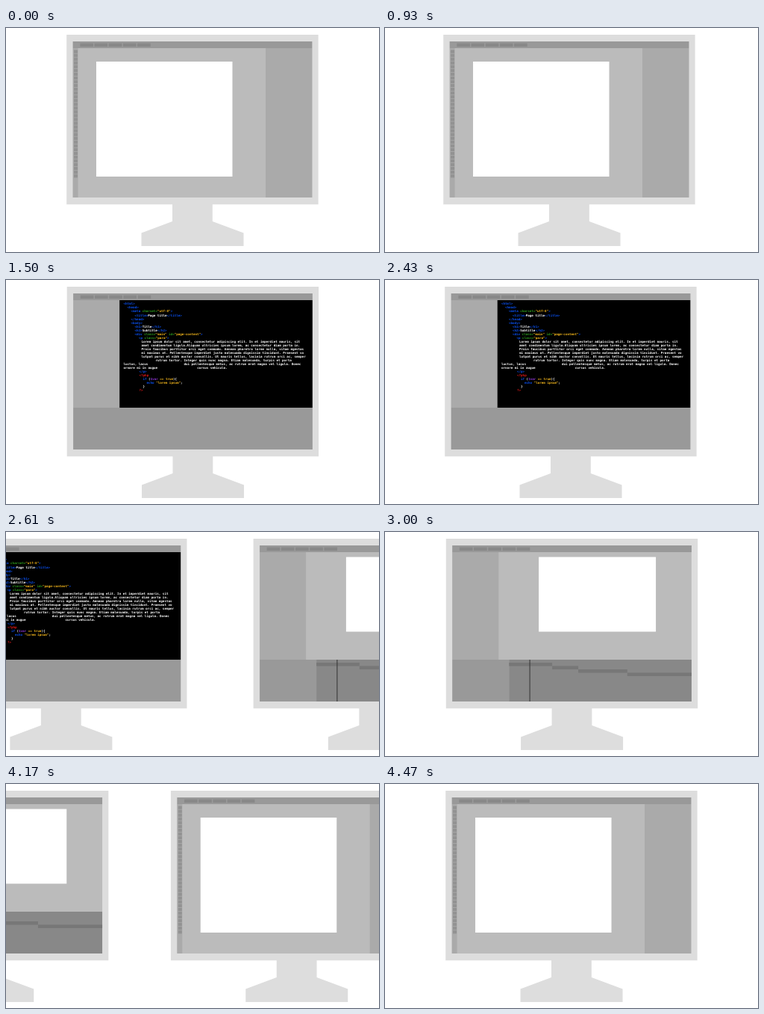
An HTML page that plays this animation: 500x300 px, repeating every 4500 ms.

```html
<!DOCTYPE html>
<html lang="en">
<head>
<meta charset="utf-8">
<title>Sliding monitors</title>
<style>
html, body { margin: 0; width: 100%; height: 100%; overflow: hidden; background: #fff; }
svg { display: block; width: 500px; height: 300px; }
text {
  font: bold 4.21px "DejaVu Sans Mono", "Liberation Mono", monospace;
  white-space: pre;
  text-rendering: geometricPrecision;
}
</style>
</head>
<body>
<svg viewBox="0 0 500 300"><g id="strip"></g></svg>
<script>
const LOOP = 4500, STEP = 30;
const slots = [0, 427, 853.5, 1274.5];
const slides = [
  { start: 902, time: 600, from: 0, to: 426.5 },
  { start: 2410, time: 600, from: 426.5, to: 853 },
  { start: 3900, time: 576, from: 853, to: 1274.5 }
];

// Rectangle from its left, top, right and bottom edges
const box = (l, t, r, b, fill) =>
  `<rect x="${l}" y="${t}" width="${r - l}" height="${b - t}" fill="${fill}"/>`;
const repeat = (n, draw) => Array.from({ length: n }, (_, i) => draw(i)).join('');

const inks = { b: '#0a50f0', g: '#2c9a1c', y: '#f5b81c', w: '#fff', r: '#e01818', p: '#8a35d0' };

// Each line: left edge, then runs that begin with their ink letter
const code = [
  [157, 'b<html>'],
  [162, 'b<head>'],
  [167, 'b<meta |gcharset=|y"utf-8"|b>'],
  [172, 'b<title>|wPage title|b</title>'],
  [167, 'b</head>'],
  [167, 'b<body>'],
  [172, 'b<h1>|wTitle|b</h1>'],
  [172, 'b<h2>|wSubtitle|b</h2>'],
  [172, 'b<div |gclass=|y"main" |gid=|y"page-content"|b>'],
  [177.5, 'b<p |gclass=|y"para"|b>'],
  [181, 'wLorem ipsum dolor sit amet, consectetur adipiscing elit. In et imperdiet mauris, sit'],
  [181, 'wamet condimentum ligula.Aliquam ultricies ipsum lorem, ac consectetur diam porta in.'],
  [181, 'wProin faucibus porttitor orci eget commodo. Aenean pharetra lorem nulla, vitae egestas'],
  [181, 'wmi maximus at. Pellentesque imperdiet justo malesuada dignissim tincidunt. Praesent vo'],
  [181, 'wlutpat purus et nibh auctor convallis. Ut mauris tellus, lacinia rutrum orci ac, semper'],
  [200, 'wrutrum tortor. Integer quis nunc magna. Etiam malesuada, turpis et porta'],
  [157, 'wluctus, lacus' + ' '.repeat(19) + 'dui pellentesque metus, ac rutrum erat magna vel ligula. Donec'],
  [157, 'wornare mi in augue' + ' '.repeat(21) + 'cursus vehicula.'],
  [178, 'b</p>'],
  [178, 'r<?php'],
  [183, 'bif |w(|p$var |y== true|w){'],
  [188, 'becho |y"lorem ipsum"|w;'],
  [183, 'w}'],
  [178, 'r?>']
];

const run = s => `<tspan fill="${inks[s[0]]}">${s.slice(1).replace(/</g, '&lt;')}</tspan>`;
const codeText = code.map(([x, runs], i) =>
  `<text x="${x}" y="${33.4 + i * 5.04}">${runs.split('|').map(run).join('')}</text>`).join('');

const painter =
  box(89.7, 27, 96.5, 227, '#aaa') +
  repeat(34, i => box(91, 29.5 + i * 5.05, 96, 33.7 + i * 5.05, '#929292')) +
  box(348, 27, 410.3, 227, '#aaa') +
  box(121, 45, 303.5, 199, '#fff');

const editor =
  box(89.7, 27, 152, 171, '#aaa') +
  box(151.7, 27, 410.3, 171, '#000') +
  box(89.7, 171, 410.3, 227, '#999') +
  codeText;

const clips = [165.7, 223.5, 258.5, 324.2, 410.3];
const timeline =
  box(89.7, 27, 151.7, 171, '#aaa') +
  box(205.5, 33.5, 362.5, 133.5, '#fff') +
  box(89.7, 171, 165.7, 227, '#999') +
  box(165.7, 171, 410.3, 227, '#888') +
  repeat(4, i => box(clips[i], 175 + i * 4.5, clips[i + 1], 179.5 + i * 4.5, '#777')) +
  box(193, 171, 194, 227, '#333');

const monitor = (x, screen) => `<g transform="translate(${x})">` +
  box(81.2, 9, 418.6, 236.3, '#ddd') +
  '<path d="M223 236V259L181.5 274.5V292H318.5V274.5L276.8 259V236Z" fill="#ddd"/>' +
  box(89.7, 18, 410.3, 227, '#bbb') +
  box(89.7, 18, 410.3, 27, '#999') +
  repeat(5, i => box(99.3 + i * 19.2, 20.5, 116.9 + i * 19.2, 25, '#888')) +
  screen + '</g>';

const strip = document.getElementById('strip');
strip.innerHTML = [painter, editor, timeline, painter]
  .map((screen, i) => monitor(slots[i], screen)).join('');

// cubic-bezier(1/3, 0, 1/3, 1), solved by bisection
function ease(x) {
  if (x <= 0 || x >= 1) return x <= 0 ? 0 : 1;
  let lo = 0, hi = 1;
  for (let i = 0; i < 24; i++) {
    const s = (lo + hi) / 2;
    if (s - s * s + s ** 3 < x) lo = s; else hi = s;
  }
  return lo * lo * (3 - 2 * lo);
}

function scrollAt(t) {
  return slides.reduce((sum, s) => sum + (s.to - s.from) * ease((t - s.start) / s.time), 0);
}

const begin = performance.now();
function frame() {
  const t = Math.floor((performance.now() - begin) % LOOP / STEP) * STEP;
  strip.setAttribute('transform', `translate(${-scrollAt(t)})`);
  requestAnimationFrame(frame);
}
frame();
</script>
</body>
</html>
```
